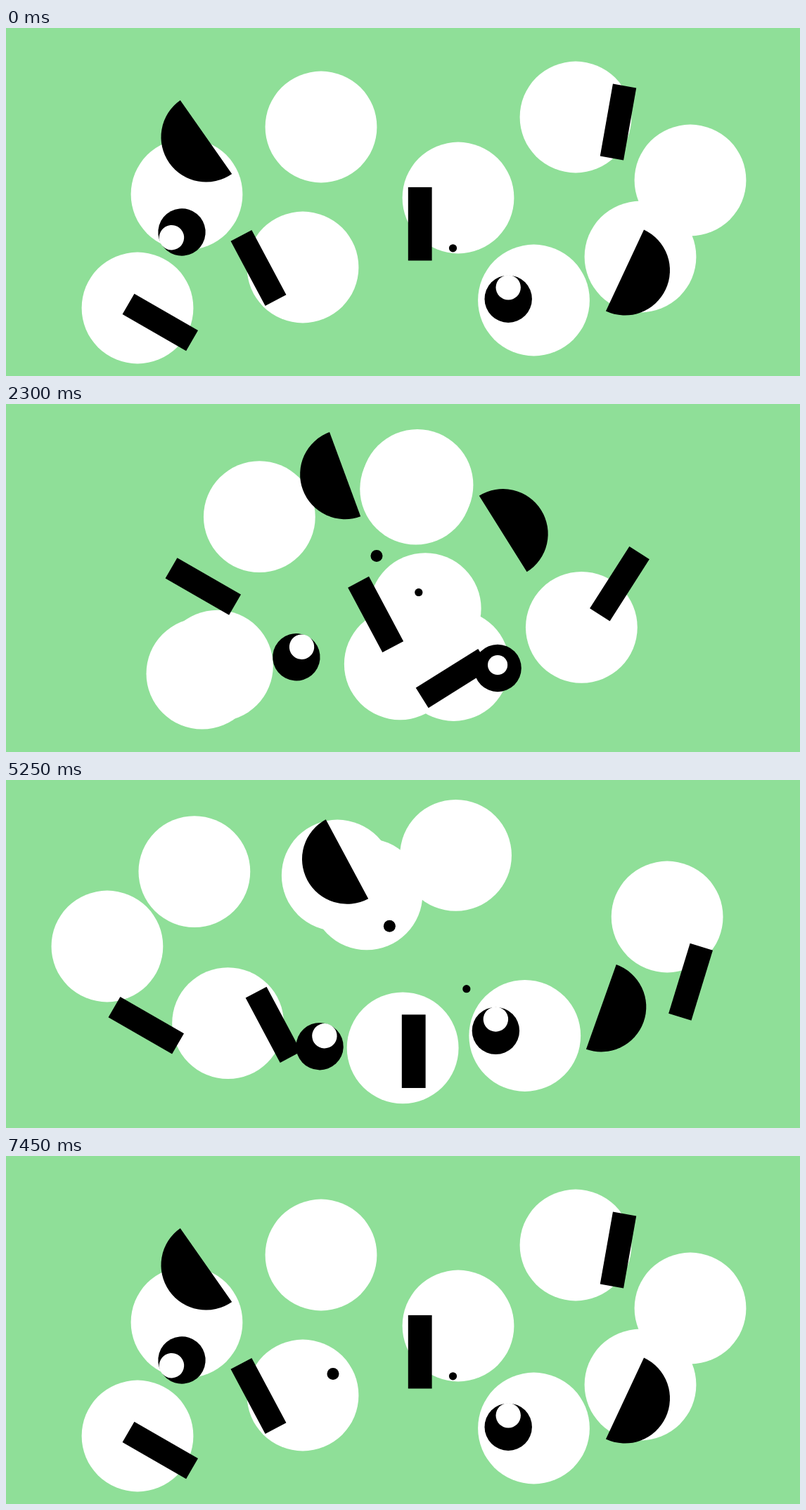
Animation, 1129 px wide and 496 px high, one loop 7500 ms. Source, as an HTML page with a canvas:

```html
<!DOCTYPE html>
<html lang="en">
<head>
<meta charset="utf-8">
<title>Assembling dog</title>
<style>
  html, body { margin: 0; width: 100%; height: 100%; overflow: hidden; background: #8fdf98; }
  canvas { display: block; }
</style>
</head>
<body>
<canvas id="stage" width="1129" height="496"></canvas>
<script>
const ctx = document.getElementById('stage').getContext('2d');
const LOOP = 7500, STEP = 50;
const OUT = 1010, MID = 2000, TURN = 3235, DOG = 4100, RELEASE = 4300, BURST = 5400, HOME = 7440;

// Each part glides in straight lines: home, out, (mid, turn), dog, burst, home.
// It bursts back to its outer point unless told otherwise. Poses are [x, y, degrees].
function path(home, out, dog, { outAt = OUT, mid, turn, burst = out, drift } = {}) {
  return [
    [0, home], [outAt, out], [MID, mid], [TURN, turn], [DOG, dog], [RELEASE, dog],
    [BURST, burst], [6200, drift], [HOME, home], [LOOP, home]
  ].filter(([, pose]) => pose);
}

// A part that leaps from the dog straight to its home.
const homing = (home, out, dog, options) => path(home, out, dog, { ...options, burst: home });

const puffs = [
  path([448, 141], [223, 116], [552, 223]),
  path([257, 237], [451, 329], [626, 131], { turn: [771, 404], burst: [495, 168] }),
  path([187, 399], [97, 240], [441, 218], { mid: [277, 399] }),
  path([422, 341], [447, 109], [625, 307], { turn: [681, 130] }),
  path([643, 242], [666, 103.5], [472, 132]),
  path([810, 127], [567, 390], [546, 330], { outAt: 1450 }),
  path([973, 217], [277, 385], [560, 104], { outAt: 2294, turn: [572, 259] }),
  path([902, 326], [1015, 177], [466, 309], { mid: [698, 319], turn: [279, 206] }),
  homing([750.5, 388], [934, 392], [657, 215.5])
];

const leftEar = path([284.5, 155.5, -35], [489, 101, -35], [459.5, 187, 15],
  { outAt: 1980, turn: [462, 97.8, 23] });
const rightEar = homing([880, 345.5, 25], [778, 208, -32], [633, 183.5, -15],
  { turn: [655, 168.5, -32] });

const legs = [
  path([219.3, 419.5, -60], [201, 242, -60], [391, 285, -60], { burst: [169, 360, -60] }),
  homing([359, 342, -28], [534, 234, -28], [514, 392, -28]),
  path([588.7, 279.2, 0], [717, 232, 70], [575.8, 433.3, 0], { mid: [646, 384, 67.5], burst: null }),
  path([870.5, 134, 10], [978, 234.6, 12.6], [717.5, 286, 61],
    { turn: [796, 272, 47], burst: [1014, 288, 10] })
];

const leftEye = path([250, 291, -118], [396.2, 391.7, 32], [513, 175, 3],
  { outAt: MID, burst: [435.5, 412, 28] });
const rightEye = homing([714.2, 386.2], [714.2, 386.2], [583.5, 175],
  { outAt: MID, turn: [652, 346] });

const nose = path([465, 310.5], [509, 177], [528.7, 285], { turn: [540, 245], burst: [548, 196] });
const freckle = path([635.5, 313.8], [567, 250], [546, 245],
  { outAt: TURN, burst: [672, 306], drift: [706, 132] });

function poseAt(keys, t) {
  const i = keys.findIndex(([time]) => time > t);
  const [start, from] = keys[i - 1], [end, to] = keys[i];
  return from.map((v, j) => v + (to[j] - v) * (t - start) / (end - start));
}

function place([x, y, angle = 0], draw) {
  ctx.save();
  ctx.translate(x, y);
  ctx.rotate(angle * Math.PI / 180);
  draw();
  ctx.restore();
}

function disc(y, r, color, start = 0, sweep = 2 * Math.PI) {
  ctx.fillStyle = color;
  ctx.beginPath();
  ctx.arc(0, y, r, start, start + sweep);
  ctx.fill();
}

function eye(pose, squint) {
  place(pose, () => {
    disc(0, 33.7, '#000');
    disc(-16.4 * (1 - squint), 17.7 - 5 * squint, '#fff');
  });
}

function render(t) {
  const put = (keys, draw) => place(poseAt(keys, t), draw);
  // The right pupil shrinks to the centre and recovers before the dog is complete.
  const squint = Math.max(0, Math.min(1, t / OUT, (3100 - t) / 1100));

  ctx.fillStyle = '#8fdf98';
  ctx.fillRect(0, 0, 1129, 496);
  for (const puff of puffs) put(puff, () => disc(0, 79.4, '#fff'));
  ctx.fillStyle = '#000';
  for (const leg of legs) put(leg, () => ctx.fillRect(-16.9, -52.3, 33.8, 104.6));
  put(leftEar, () => disc(0, 64, '#000', Math.PI / 2, Math.PI));
  put(rightEar, () => disc(0, 64, '#000', -Math.PI / 2, Math.PI));
  eye(poseAt(leftEye, t), 0);
  eye(poseAt(rightEye, t), squint);
  if (t > 0) put(nose, () => disc(0, 8.5, '#000'));
  put(freckle, () => disc(0, 5.6, '#000'));
}

const begin = performance.now();
function tick() {
  const t = (performance.now() - begin) % LOOP;
  render(Math.floor(t / STEP) * STEP);
  requestAnimationFrame(tick);
}
tick();
</script>
</body>
</html>
```
